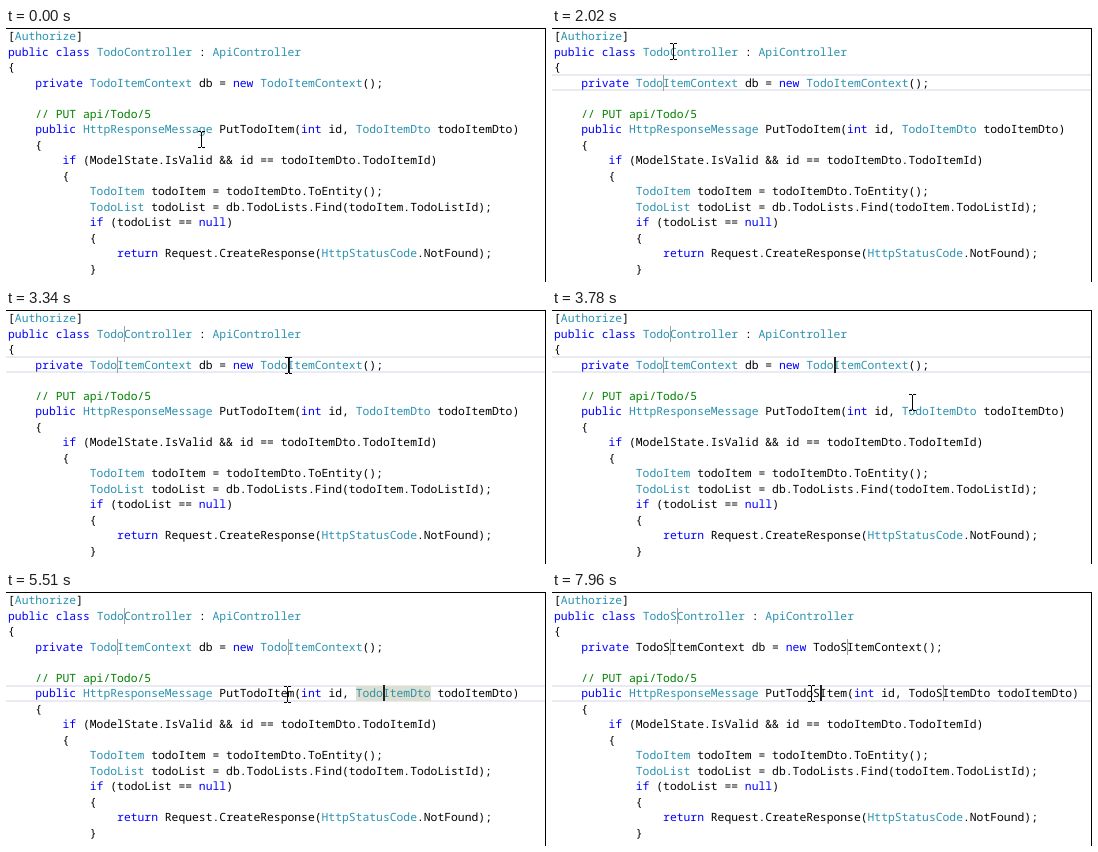
An HTML page that plays this animation: 540 by 254 pixels, repeating every 8 s.

```html
<!DOCTYPE html>
<html lang="en">
<head>
<meta charset="utf-8">
<title>Multiple carets</title>
<style>
html, body { margin: 0; width: 100%; height: 100%; overflow: hidden; background: #fff; }
#stage { position: relative; width: 540px; height: 254px; overflow: hidden; background: #fff; }
#stage div, #mouse { position: absolute; }
#code div {
  left: 2px; height: 16px; white-space: pre; color: #000;
  font: 11.367px/16px "Noto Sans Mono", "DejaVu Sans Mono", monospace;
  font-variant-ligatures: none; text-rendering: geometricPrecision;
}
.k { color: #00f; }
.t { color: #2b91af; }
.c { color: #008000; }
#row { left: -2px; width: 546px; height: 17px; box-sizing: border-box; border: 2px solid #eaeaf2; }
#ref { left: 350px; top: 94px; width: 75px; height: 15px; background: #dde0d0; }
.caret { height: 16px; }
#tip {
  box-sizing: border-box; height: 37px; padding: 0 14px 0 13px; white-space: nowrap;
  background: #d8eee0; border: 1px solid #bccfc3; color: #1e1e1e;
  font: 11.55px/33px "Open Sans", "Noto Sans", sans-serif; text-rendering: geometricPrecision;
}
#mouse { left: 0; top: 0; width: 9px; height: 17px; }
#edge { inset: 0; border: solid #000; border-width: 1px 1px 0 0; }
</style>
</head>
<body>
<div id="stage">
  <div id="row"></div>
  <div id="ref"></div>
  <div id="code"></div>
  <div id="carets"></div>
  <div id="tip"></div>
  <svg id="mouse" viewBox="0 0 9 17" shape-rendering="crispEdges">
    <path d="M1 .5h3M5 .5h3M4.5 1v15M1 16.5h3M5 16.5h3" fill="none" stroke="#000"/>
  </svg>
  <div id="edge"></div>
</div>
<script>
const LOOP = 8000, CHAR = 6.82, LEFT = 2, PITCH = 15.53, BLINK = 530, TYPED = 7070;
const $ = id => document.getElementById(id);

// "|" marks the places where the typed letter goes
const CODE = `[Authorize]
public class Todo|Controller : ApiController
{
    private Todo|ItemContext db = new Todo|ItemContext();

    // PUT api/Todo/5
    public HttpResponseMessage PutTodo|Item(int id, Todo|ItemDto todoItemDto)
    {
        if (ModelState.IsValid && id == todoItemDto.TodoItemId)
        {
            TodoItem todoItem = todoItemDto.ToEntity();
            TodoList todoList = db.TodoLists.Find(todoItem.TodoListId);
            if (todoList == null)
            {
                return Request.CreateResponse(HttpStatusCode.NotFound);
            }`.split("\n");

const KEYWORDS = /^(public|class|private|new|int|if|null|return)$/;
const TYPES = /^(Authorize|TodoS?Controller|ApiController|TodoItemContext|HttpResponseMessage|TodoItemDto|TodoItem|TodoList|HttpStatusCode)$/;
const FRESH = /^TodoSItem(Context|Dto)$/;

// each click sets a caret at the nth mark of a row; a tip may show under that word before it
const CLICKS = [
  { at: 1360, row: 3, nth: 0, from: 640, to: 1360, tip: "class MvcApplication4.Models.TodoItemContext" },
  { at: 2350, row: 1, nth: 0 },
  { at: 3310, row: 3, nth: 1, from: 3030, to: 3150, tip: "TodoItemContext.TodoItemContext()" },
  { at: 4350, row: 6, nth: 1, from: 4220, to: 4350, tip: "class MvcApplication4.Models.TodoItemDto" },
  { at: 6380, row: 6, nth: 0 }
];

// pointer moves: start, end, x, y; it rests in between
const MOVES = [
  [0, 0, 195, 111], [0, 600, 109, 55], [1360, 1860, 121, 23], [2350, 2870, 270, 59], [2870, 3000, 282, 55],
  [3500, 3890, 378, 101], [4870, 5080, 148, 80], [5240, 5510, 281, 102], [5770, 6510, 259, 101]
];

const rowTop = row => Math.round(row * PITCH);
const colX = col => LEFT + col * CHAR;
const show = (el, on) => { el.style.visibility = on ? "visible" : "hidden"; };
const place = (el, x, y) => { el.style.left = Math.round(x) + "px"; el.style.top = y + "px"; };
const add = (parent, name) => {
  const el = $(parent).appendChild(document.createElement("div"));
  el.className = name;
  return el;
};

const lines = CODE.map((text, i) => {
  const el = add("code", "");
  el.style.top = rowTop(i) + 1 + "px";
  return el;
});
for (const c of CLICKS) {
  c.col = CODE[c.row].split("|").slice(0, c.nth + 1).join("").length;
  c.el = add("carets", "caret");
}

function paint(line, stage) {
  const text = line.replace(/\|/g, stage ? "S" : "").replace(/&/g, "&amp;");
  if (text.trim().startsWith("//")) return `<span class="c">${text}</span>`;
  return text.replace(/\w+/g, word => {
    const kind = KEYWORDS.test(word) ? "k"
      : TYPES.test(word) || (stage === 1 && FRESH.test(word)) ? "t" : "";
    return kind ? `<span class="${kind}">${word}</span>` : word;
  });
}

let painted = -1;
function drawCode(t) {
  const stage = t < TYPED ? 0 : t < TYPED + 30 ? 1 : 2;
  if (stage === painted) return;
  painted = stage;
  lines.forEach((el, i) => { el.innerHTML = paint(CODE[i], stage); });
}

function drawCarets(t) {
  const last = CLICKS.filter(c => t >= c.at).pop(), typed = t >= TYPED;
  const since = typed ? t - TYPED + 170 : last ? t - last.at + 10 : 0;
  const lit = Math.floor(since / BLINK) % 2 === 0;
  for (const c of CLICKS) {
    const strong = c === last && lit;
    place(c.el, colX(c.col + (typed ? c.nth + 1 : 0)), rowTop(c.row));
    c.el.style.width = strong ? "2px" : "1px";
    c.el.style.background = strong ? "#222" : "#a0a0a0";
    show(c.el, t >= c.at);
  }
  show($("row"), last);
  if (last) $("row").style.top = Math.floor(last.row * PITCH) + "px";
}

function drawTip(t) {
  const c = CLICKS.find(c => t >= c.from && t < c.to), el = $("tip");
  show(el, c);
  if (!c) return;
  place(el, colX(c.col - "Todo".length), rowTop(c.row) + 16);
  if (el.textContent !== c.tip) el.textContent = c.tip;
}

function drawMouse(t) {
  let x = 0, y = 0;
  for (const [from, to, toX, toY] of MOVES) {
    if (t < from) break;
    const p = t >= to ? 1 : (t - from) / (to - from), e = p * p * (3 - 2 * p);
    x += (toX - x) * e;
    y += (toY - y) * e;
  }
  $("mouse").style.transform = `translate(${Math.round(x) - 4}px, ${Math.round(y) - 8}px)`;
}

const start = performance.now();
function frame() {
  const t = (performance.now() - start) % LOOP;
  drawCode(t);
  drawCarets(t);
  drawTip(t);
  drawMouse(t);
  show($("ref"), t >= 5440 && t < 6380);
  requestAnimationFrame(frame);
}
frame();
</script>
</body>
</html>
```
